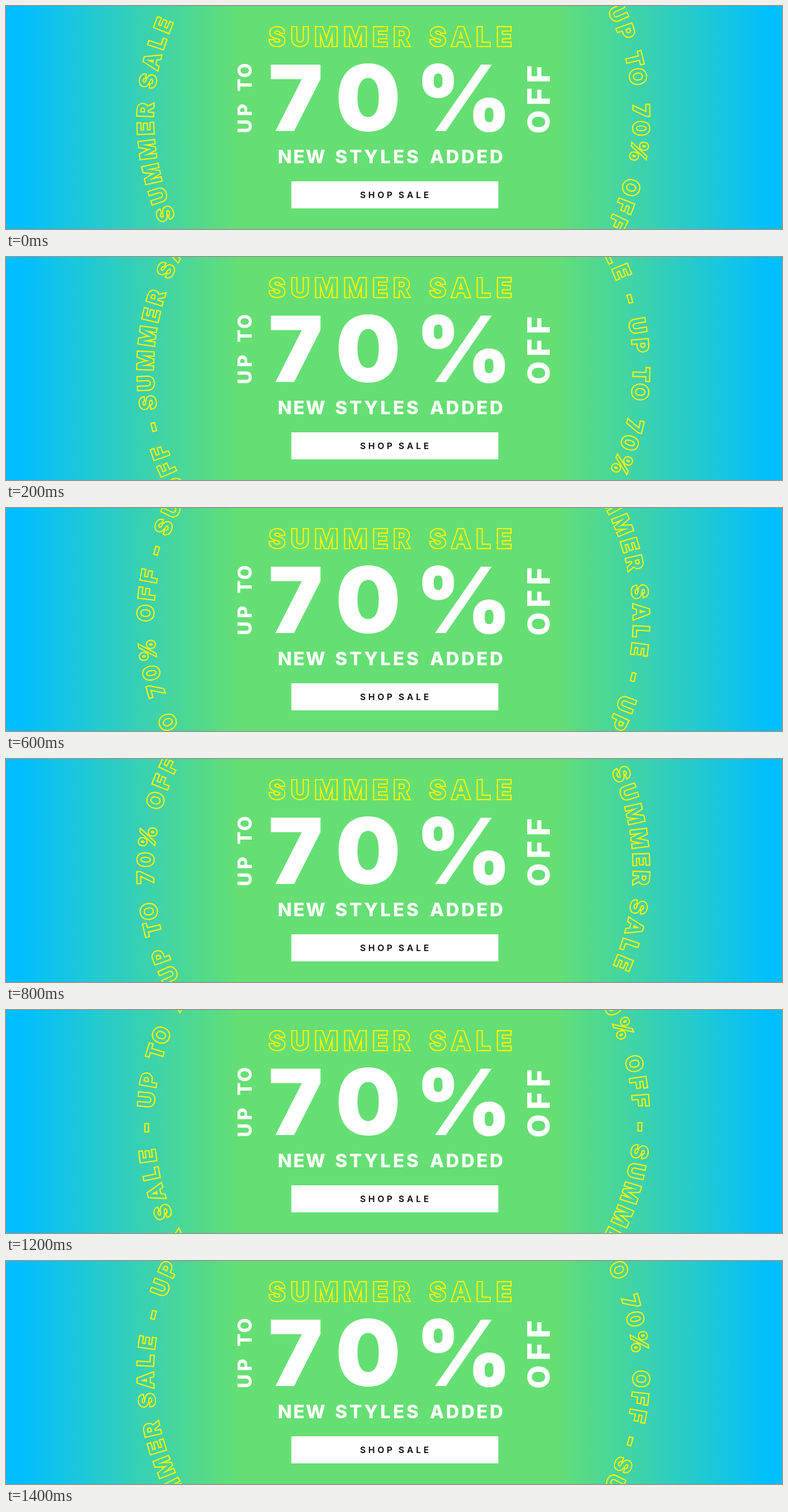
These frames come from a looping animation (1200x346 px, 1600 ms). An HTML page:

```html
<!DOCTYPE html>
<html lang="en">
<head>
<meta charset="utf-8">
<title>Summer sale</title>
<style>
  html, body { margin: 0; width: 100%; height: 100%; overflow: hidden; }
  svg { display: block; width: 100%; height: 100%; font: 800 16px Inter, Roboto, Arial, sans-serif; }
  text { text-anchor: middle; }
  .outline { font-weight: 700; fill: #000; stroke: #fff; stroke-width: 3.8; paint-order: stroke; }
  #figure { font-weight: 900; }
  #button { font-weight: 600; }
</style>
</head>
<body>
<svg viewBox="0 0 1200 346" preserveAspectRatio="none">
  <defs>
    <linearGradient id="sky">
      <stop offset="0.02" stop-color="#00bfff"/>
      <stop offset="0.302" stop-color="#65df73"/>
      <stop offset="0.705" stop-color="#65df73"/>
      <stop offset="0.985" stop-color="#00bfff"/>
    </linearGradient>
    <path id="arc"/>
    <!-- White stroke under black fill leaves only the outer contour of each letter. -->
    <mask id="contours" maskUnits="userSpaceOnUse" x="0" y="0" width="1200" height="346">
      <g id="heading" class="outline"></g>
      <g id="ring" class="outline"></g>
    </mask>
  </defs>
  <rect width="1200" height="346" fill="url(#sky)"/>
  <rect width="1200" height="346" fill="#fff200" mask="url(#contours)"/>
  <g id="figure" fill="#fff"></g>
  <g id="copy" fill="#fff"></g>
  <rect x="441.3" y="272" width="320" height="42" fill="#fff"/>
  <g id="button"></g>
</svg>
<script>
const SVG = 'http://www.w3.org/2000/svg';
const CENTER = { x: 599, y: 173 };
const RADIUS = 371.5;
const REPEATS = 3;
const LOOP = 1600;
const STEPS = 8;
const byId = id => document.getElementById(id);

function add(parent, tag, attrs, content = '') {
  const node = document.createElementNS(SVG, tag);
  for (const [name, value] of Object.entries(attrs)) node.setAttribute(name, value);
  node.textContent = content;
  parent.append(node);
  return node;
}

// Centres a word on (x, y); half the tracking offsets the space after the last letter.
function word(parent, content, x, y, size, tracking = 0) {
  return add(parent, 'text', {
    x: x + tracking / 2, y, 'font-size': size, 'letter-spacing': tracking
  }, content);
}

// Same, reading upwards along a vertical baseline.
function upright(parent, content, x, y, size, tracking) {
  const node = word(parent, content, 0, 0, size, tracking);
  node.setAttribute('transform', `translate(${x} ${y}) rotate(-90)`);
}

function ringWord(content, angle, tracking) {
  const node = add(byId('ring'), 'text', {
    transform: `rotate(${angle + 90} ${CENTER.x} ${CENTER.y})`,
    'font-size': 33.2, 'letter-spacing': tracking
  });
  add(node, 'textPath', {
    href: '#arc', startOffset: RADIUS * Math.PI / 2 + tracking / 2
  }, content);
}

byId('arc').setAttribute('d',
  `M${CENTER.x - RADIUS} ${CENTER.y}a${RADIUS} ${RADIUS} 0 0 1 ${2 * RADIUS} 0`);

const heading = byId('heading');
word(heading, 'SUMMER', 515.5, 61.6, 39.5, 8);
word(heading, 'SALE', 718.5, 61.6, 39.5, 8.8);

const figure = byId('figure');
word(figure, '7', 448, 194, 142);
word(figure, '0', 560, 194, 142);
word(figure, '%', 707.5, 194, 142);

const copy = byId('copy');
upright(copy, 'UP', 380, 174.5, 29.5, 5);
upright(copy, 'TO', 380, 110.5, 29.5, 2);
upright(copy, 'OFF', 841, 145, 47.5, 7);
word(copy, 'NEW', 457, 243.5, 28.5, 2);
word(copy, 'STYLES', 573.5, 243.5, 28.5, 3.5);
word(copy, 'ADDED', 712, 243.5, 28.5, 3);

const button = byId('button');
word(button, 'SHOP', 572.5, 298, 13.5, 4);
word(button, 'SALE', 630.5, 298, 13.5, 4.2);

// Word centres in degrees, clockwise from the right; the phrase fills a third of the ring.
const phrase = [
  ['70%', 3.6, 6.5], ['OFF', 20.5, 7], ['-', 31.2, 0], ['SUMMER', 49.3, 6.4],
  ['SALE', 75.1, 7.8], ['-', 88.5, 0], ['UP', 97.2, 7], ['TO', 108.5, 4]
];
for (let i = 0; i < REPEATS; i++) {
  for (const [content, angle, tracking] of phrase) {
    ringWord(content, angle + i * 360 / REPEATS, tracking);
  }
}

function draw(time) {
  const step = Math.floor((time % LOOP) / LOOP * STEPS);
  const turn = step * 360 / REPEATS / STEPS;
  byId('ring').setAttribute('transform', `rotate(${turn} ${CENTER.x} ${CENTER.y})`);
}

const start = performance.now();
function tick() {
  draw(performance.now() - start);
  requestAnimationFrame(tick);
}
tick();
</script>
</body>
</html>
```
